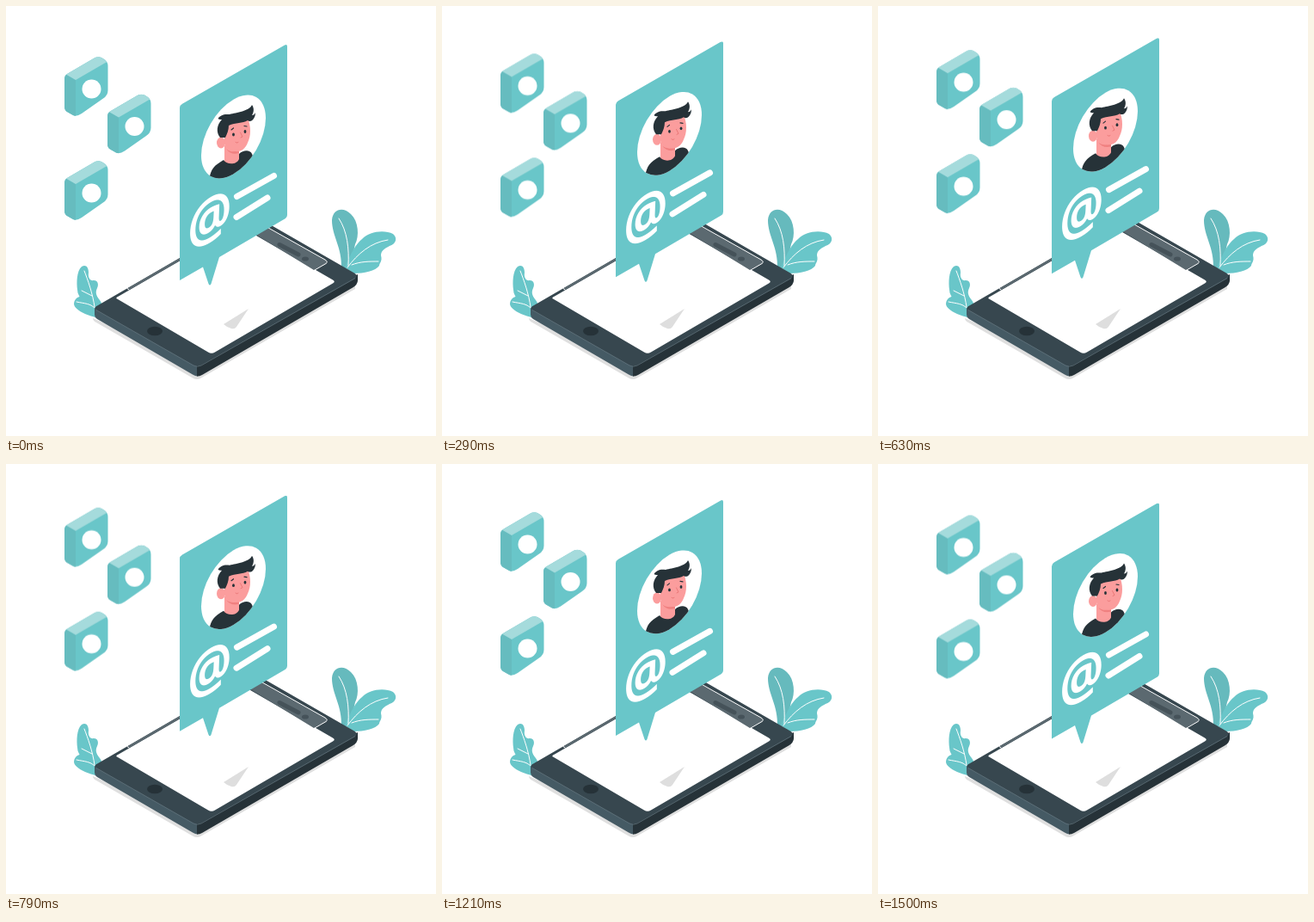
Animation of 500x500 px, one loop 1.54 s. Source, as an HTML page:

```html
<!DOCTYPE html>
<html lang="en">
<head>
<meta charset="utf-8">
<title>Social profile</title>
<style>
  html, body { margin: 0; width: 100%; height: 100%; overflow: hidden; background: #fff; }
  svg { display: block; width: 100%; height: 100%; }
  .teal { fill: #69c6c9; }
  .vein { fill: none; stroke: #fff; stroke-width: 1; stroke-linecap: round; }
  .dark { fill: #263238; }
  .skin { fill: #fb9d9d; }
  .bar { stroke: #fff; stroke-width: 7; stroke-linecap: round; }
  .at { font: 700 66px "Open Sans", sans-serif; fill: #fff; text-anchor: middle; }
</style>
</head>
<body>
<svg viewBox="0 0 500 500">
  <defs>
    <clipPath id="tileShape">
      <path d="M68 85Q68 81 71 79L101 61.500Q106 58 111 60L115 62.500Q118.500 65 118.500 70V98Q118.500 104 113 107.500L88 125Q82 129 78 127L71 123Q68 121 68 117Z"/>
    </clipPath>
    <clipPath id="disc">
      <circle r="43.300" transform="matrix(.866 -.5 0 1 264.5 152)"/>
    </clipPath>
    <g id="tile">
      <g clip-path="url(#tileShape)">
        <path class="teal" d="M60 50H125V135H60Z"/>
        <path fill="#66bcbf" d="M60 74L81 86V135H60Z"/>
        <path fill="#a5dbdc" d="M60 74L81 86L125 60.500V50H60Z"/>
      </g>
      <circle cx="99.500" cy="96.500" r="11" fill="#fff"/>
    </g>
  </defs>

  <!-- plants -->
  <g class="teal">
    <path d="M104 354C94 346 83 340 83 330C82 322 82 308 88 303C93 300 96 304 96 310C95 316 98 320 102 319C107 319 108 324 106 328C103 334 106 338 109 342C112 346 112 350 112 352Z"/>
    <path d="M104 362C96 360 79 354 79 346C80 338 88 336 94 338C100 338 106 343 108 352Z"/>
    <path fill="#66babd" d="M390 306C391 280 379 268 379 249C380 236 392 233 401 242C410 250 411 268 406 277L400 304Z"/>
    <path d="M394 304C402 285 407 277 414 271C422 262 440 260 450 265C456 270 453 277 446 279C440 282 436 285 436 290C438 297 434 299 434 302C430 308 416 311 404 311Z"/>
  </g>
  <path class="vein" d="M103 350C101 335 95 318 91 308M82 344C92 346 98 346 103 351M88 331L100 337M387 247C397 262 399 282 398 302M397 304C409 288 424 275 444 272M402 301C412 297 422 297 433 297"/>

  <!-- phone -->
  <path fill="#dfdfdf" d="M101 363Q101 366 105 368L217 432.500Q222 435.500 227 432.500L406 329V315L222 415Z"/>
  <path fill="#455a64" d="M103 351V359Q103 362 106 364L217 428.500Q220 430.500 223 430.500V417Z"/>
  <path class="dark" d="M222 417V430.500Q224 431 228 429L403 327.500Q409 324 409 319V312Z"/>
  <path fill="#37474f" d="M107 348L284 245.500Q288 243 292 245.500L405 310.500Q411 314 405 317.500L227 417.500Q222 420 218 417.500L107 354.500Q100 351 107 348Z"/>
  <path fill="none" stroke="#60717a" stroke-width=".8" d="M105 353.500L218 418Q222 420.500 227 418L406 316.500"/>
  <path fill="#fff" d="M131 337.500L272 256L380 318.500Q383.500 320.500 380 322.500L243 402.500Q239 405 235 402.500L130 341Q126 339.500 131 337.500Z"/>
  <path fill="none" stroke="#5b6970" stroke-width="2.600" d="M142 329.300L272 254"/>
  <path fill="#5b6970" d="M268 252L286 247L303 257L371 295Q375 297.500 372 299.500L358 307Z"/>
  <path class="vein" d="M298 254L371 295Q375 297.500 372 299.500L359 307M141 328.500L143 330"/>
  <path stroke="#455259" stroke-width="5" stroke-linecap="round" d="M318 277.500L340 289"/>
  <ellipse cx="348" cy="294" rx="4" ry="2.600" fill="#455259"/>
  <ellipse class="dark" cx="173" cy="378" rx="9" ry="5.200"/>
  <path fill="#dedede" d="M282 352L268 373Q266 376 262 375Q256 373 253 370Z"/>

  <g id="floaters">
    <use href="#tile"/>
    <use href="#tile" x="50" y="43.500"/>
    <use href="#tile" y="121"/>

    <!-- profile card -->
    <path class="teal" d="M202 118.500Q202 115.500 205 113.800L324 45.500Q327 44 327 47V243Q327 245.500 325 247L248 292L238.500 323Q237 326 235.500 323L229 303.500L202 319Z"/>
    <circle r="43.300" fill="#fff" transform="matrix(.866 -.5 0 1 264.5 152)"/>
    <g clip-path="url(#disc)">
      <path class="skin" d="M254 162V184H271V165Z"/>
      <path fill="#f08080" d="M256 166C260 170 266 170 271 168V171C265 173 259 171 256 166Z"/>
      <path class="skin" d="M254 140L281 130C285 140 285 151 281 159C278 167 272 170 267 169C260 168 255 165 254 160Z"/>
      <ellipse class="skin" cx="250" cy="159" rx="5" ry="6.500"/>
      <path class="dark" d="M249 153C244 147 245 138 251 132C246 132 246 131 248 129C253 125 257 126 260 126C268 124 283 122 286 115C289 119 288 124 286 127C288 127 289 126 290 124C290 131 285 136 281 133C275 137 267 135 259 139C259 144 257 149 255 153Z"/>
      <path class="dark" d="M236 203C238 190 241 186 253 179C257 185 268 185 271 178V172C276 167 284 167 286 172L292 186L250 212Z"/>
      <ellipse class="dark" cx="264.500" cy="149.500" rx="1.400" ry="1.900"/>
      <ellipse class="dark" cx="278" cy="146" rx="1.400" ry="1.900"/>
      <path fill="none" stroke="#263238" stroke-width="1.200" stroke-linecap="round" d="M262 144L264.500 142M277 139.500L280 140"/>
      <path fill="none" stroke="#e87474" stroke-width=".9" stroke-linecap="round" d="M272.500 147L275 152L273 153M267 158.500Q268.500 160 270 158.500"/>
    </g>
    <text class="at" transform="matrix(.866 -.5 0 1 237 250)" y="20.500">@</text>
    <path class="bar" d="M268.500 221.500L311.500 197.500M268 245.500L304 223"/>
  </g>
</svg>
<script>
  const LOOP = 1540;
  // [time in ms, vertical shift in px]
  const steps = [[0, 0], [730, -9.1], [1500, 0.5], [LOOP, 0]];
  document.getElementById('floaters').animate(
    steps.map(([t, y]) => ({ offset: t / LOOP, transform: `translateY(${y}px)` })),
    { duration: LOOP, iterations: Infinity }
  );
</script>
</body>
</html>
```
